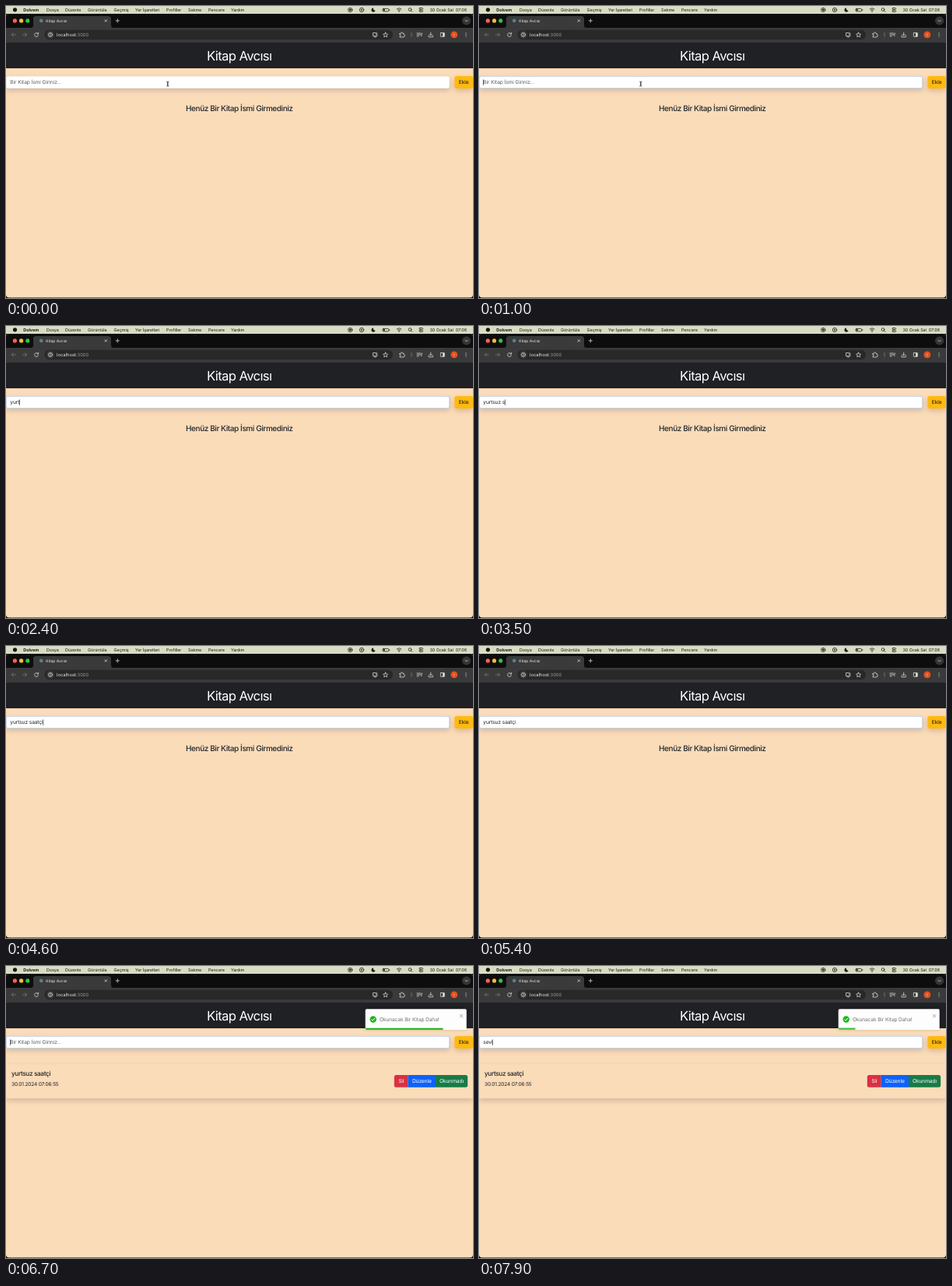
An HTML page for the animation above (8000 ms loop, 600 by 375 pixels).

```html
<!DOCTYPE html>
<html lang="tr">
<head>
<meta charset="utf-8">
<title>Kitap Avcısı</title>
<style>
  html, body { margin: 0; width: 100%; height: 100%; overflow: hidden; background: #000; }
  svg { display: block; width: 100vw; height: 100vh; }
  text {
    font: 400 6.67px Inter, Roboto, "Liberation Sans", sans-serif;
    letter-spacing: -.018em;
    text-rendering: geometricPrecision;
    white-space: pre;
    fill: #212529;
  }
  .mid { text-anchor: middle; }
  .menu text { font-size: 5.42px; letter-spacing: -.01em; fill: #17180f; }
  .menu .app { font-weight: 700; }
  .ui text { letter-spacing: 0; fill: #e8e8e8; }
  .line { fill: none; stroke-width: .8; stroke-linecap: round; stroke-linejoin: round; }
  .ui .line { stroke: #d6d6d6; }
  .menu .line { stroke: #22231a; }
  .ui .dim { stroke: #7b7b7b; }
  .shadow { filter: drop-shadow(0 3.3px 3.3px rgba(0, 0, 0, .16)); }
  .white { fill: #fff; }

  #field { stroke: #dee2e6; stroke-width: .5; animation: focus 8s linear infinite; }
  #beam { animation: beam 8s step-end infinite; }
  #empty { animation: empty 8s step-end infinite; }
  #card { animation: card 8s step-end infinite; }
  #toast {
    filter: drop-shadow(0 .5px 2px rgba(0, 0, 0, .16));
    animation: toast 8s cubic-bezier(.215, .61, .355, 1) infinite;
  }
  #bar { transform-origin: 461.7px 0; animation: bar 8s linear infinite; }

  @keyframes focus {
    0%, 10% { stroke: #dee2e6; }
    11.875%, 100% { stroke: #78aaf5; }
  }
  @keyframes beam { 0% { opacity: 1; } 21.25%, 100% { opacity: 0; } }
  @keyframes empty { 0% { opacity: 1; } 68.75%, 100% { opacity: 0; } }
  @keyframes card { 0% { opacity: 0; } 68.75%, 100% { opacity: 1; } }
  @keyframes toast {
    0%, 69.225% { transform: translateX(1250px); opacity: 0; }
    74.475% { transform: translateX(-10.4px); opacity: 1; }
    75.7875% { transform: translateX(4.2px); }
    77.1% { transform: translateX(-2.1px); }
    77.975%, 100% { transform: none; opacity: 1; }
  }
  @keyframes bar {
    0%, 77.975% { transform: none; }
    100% { transform: scaleX(.119); }
  }
</style>
</head>
<body>
<svg viewBox="0 0 600 375" preserveAspectRatio="none">
  <defs>
    <clipPath id="window"><rect y="10" width="600" height="364.4" rx="4"/></clipPath>
    <clipPath id="round"><rect x="461.7" y="55.2" width="130" height="26.7" rx="1.7"/></clipPath>
  </defs>

  <g class="menu">
    <rect width="600" height="10" fill="#d9dcc4"/>
    <circle cx="11.5" cy="4.8" r="2.6" fill="#17180f"/>
    <text class="app" x="22.3" y="6.9">Dolvem</text>
    <text x="52" y="6.9">Dosya</text>
    <text x="76" y="6.9">Düzenle</text>
    <text x="105" y="6.9">Görüntüle</text>
    <text x="138.6" y="6.9">Geçmiş</text>
    <text x="166" y="6.9">Yer İşaretleri</text>
    <text x="206" y="6.9">Profiller</text>
    <text x="234" y="6.9">Sekme</text>
    <text x="260" y="6.9">Pencere</text>
    <text x="289" y="6.9">Yardım</text>
    <text x="592" y="6.9" text-anchor="end">30 Ocak Sal  07:06</text>
    <g class="line">
      <circle cx="442.2" cy="5" r="2.7"/>
      <circle cx="457" cy="5" r="2.7"/>
      <rect x="484" y="3.4" width="7.6" height="3.5" rx="1"/>
      <path d="M492.7 4.6v1M502 3.9q3-2.6 6 0M503.3 5.4q1.7-1.5 3.4 0"/>
      <circle cx="519" cy="4.5" r="1.9"/>
      <path d="M520.5 6l1.5 1.5"/>
      <rect x="531" y="2.5" width="4.6" height="1.9" rx=".9"/>
      <rect x="531" y="5.6" width="4.6" height="1.9" rx=".9"/>
    </g>
    <g fill="#22231a">
      <circle cx="442.2" cy="5" r="1.4"/>
      <path d="M456.2 3.6l2.3 1.4-2.3 1.4zM472 2.3a2.7 2.7 0 1 0 2.6 3.6A2.7 2.7 0 0 1 472 2.3z"/>
      <rect x="484.7" y="4.1" width="2" height="2.1"/>
      <circle cx="505" cy="7" r=".8"/>
    </g>
  </g>

  <g clip-path="url(#window)">
    <rect y="10" width="600" height="365" fill="#fbdcb9"/>

    <g class="ui">
      <rect y="10" width="600" height="19" fill="#0d0d0d"/>
      <rect y="28" width="600" height="19" fill="#3a3a3a"/>
      <path d="M32 28q3 0 3-3v-8.5q0-3.5 3.5-3.5h93q3.5 0 3.5 3.5v8.500q0 3 3 3z" fill="#3a3a3a"/>
      <circle cx="11.4" cy="18.9" r="2.6" fill="#fe5f57"/>
      <circle cx="19.6" cy="18.9" r="2.6" fill="#febc2e"/>
      <circle cx="27.8" cy="18.9" r="2.6" fill="#28c840"/>
      <circle cx="45.2" cy="18.9" r="2.3" fill="#55809a"/>
      <text x="51.2" y="20.8" font-size="5" style="font-size:5px">Kitap Avcısı</text>
      <circle cx="591.6" cy="18.9" r="5.6" fill="#353535"/>
      <path class="line" d="M127 17.600l2.600 2.600m0-2.600l-2.600 2.600M141.200 18.900h4.200m-2.100-2.100v4.200M589.900 18.200l1.700 1.700 1.700-1.700"/>

      <rect x="49.500" y="30.700" width="447.500" height="12.500" rx="6.200" fill="#282828"/>
      <circle cx="57" cy="36.900" r="4.800" fill="#3b3b3b"/>
      <circle class="line" cx="57" cy="36.900" r="2.500"/>
      <path class="line" d="M57 36.700v1.300M57 35.500v.1"/>
      <text x="65" y="39" style="font-size:5.83px">localhost<tspan fill="#9b9b9b">:3000</tspan></text>
      <path class="line dim" d="M12.400 36.900h-5m2.100-2.200l-2.200 2.200 2.200 2.200M21.600 36.900h5m-2.100-2.200l2.200 2.200-2.200 2.200"/>
      <path class="line" d="M41.300 35.700a2.500 2.500 0 1 0 .3 1.900M41.600 34.200v1.800h-1.800"/>
      <path class="line" d="M474.500 34.500h-3v4h5.500v-1.300M473 39.900h2.600M476 34v2.600m-1.100-1.100l1.100 1.100 1.100-1.100"/>
      <path class="line" d="M487.600 34l.9 1.900 2.100.3-1.500 1.500.4 2.100-1.900-1-1.900 1 .4-2.100-1.500-1.500 2.100-.3z"/>
      <path class="line" d="M506 35.300h1.500q0-1.500 1.200-1.500t1.200 1.500h1.300v1.500q1.300 0 1.300 1.100t-1.300 1.100v1H506v-1.500q1.200 0 1.200-1t-1.200-1z"/>
      <path class="line dim" d="M521 34.300v5.200"/>
      <path class="line" d="M528 35h4.500M528 36.900h4.500M528 38.800h2.300M533.800 38.600v-3.400h1M543 38v1.800h5.400V38M545.700 34v3.800m-1.600-1.500l1.600 1.600 1.600-1.600"/>
      <rect class="line" x="558.300" y="34.400" width="5" height="5" rx=".6"/>
      <rect x="561" y="34.400" width="2.400" height="5" fill="#d6d6d6"/>
      <circle cx="575.800" cy="36.900" r="4.400" fill="#e5521f"/>
      <text class="mid" x="575.800" y="38.500" style="font-size:4.500px">f</text>
      <path class="line" style="stroke-width:1.200" d="M591 34.800v.01M591 36.900v.01M591 39v.01"/>
    </g>

    <rect y="47" width="600" height="33" fill="#202125"/>
    <text class="mid white" x="299.700" y="69.700" style="font-size:16.670px;letter-spacing:-.038em;fill:#fff">Kitap Avcısı</text>

    <g class="shadow">
      <rect id="field" x=".25" y="90.250" width="569.500" height="15.400" rx="2.500" fill="#fff"/>
      <rect x="576.300" y="90" width="23.700" height="15.900" rx="2.500" fill="#ffba10"/>
    </g>
    <text class="mid" x="588.200" y="100.400" style="fill:#111">Ekle</text>
    <text id="hint" x="5.300" y="100.400" style="fill:#5b5e62">Bir Kitap İsmi Giriniz...</text>
    <text id="typed" x="5.300" y="100.400"></text>
    <rect id="caret" y="94.400" width=".6" height="7.400" fill="#111"/>
    <path id="beam" class="line" stroke="#222" d="M206.600 97q1.200 0 1.200.8v4.400q0 .8-1.200.8M209 97q-1.200 0-1.200.8v4.400q0 .8 1.200.8"/>

    <text id="empty" class="mid" x="299.800" y="135.400" style="font-size:10px;font-weight:500;letter-spacing:-.042em">Henüz Bir Kitap İsmi Girmediniz</text>

    <g id="card">
      <g class="shadow">
        <rect y="126" width="600" height="44" fill="#fbdcb9" stroke="#ead0b3" stroke-width=".4"/>
      </g>
      <text x="7" y="141" style="font-size:8.330px;font-weight:500;letter-spacing:-.05em">yurtsuz saatçi</text>
      <text x="7" y="153.700" style="letter-spacing:-.033em">30.01.2024 07:06:55</text>
      <path d="M516.600 140h-15.300q-2.500 0-2.500 2.500v10.800q0 2.500 2.500 2.500h15.300z" fill="#d93043"/>
      <rect x="516.500" y="140" width="35.500" height="15.800" fill="#0d62fa"/>
      <path d="M552 140h38.600q2.500 0 2.500 2.500v10.800q0 2.500-2.500 2.500H552z" fill="#187b47"/>
      <g class="mid">
        <text x="507.700" y="150.400" style="fill:#fff">Sil</text>
        <text x="534.300" y="150.400" style="fill:#fff">Düzenle</text>
        <text x="572.500" y="150.400" style="fill:#fff">Okunmadı</text>
      </g>
    </g>

    <g id="toast">
      <rect x="461.700" y="55.200" width="130" height="26.700" rx="1.700" fill="#fdfdfd"/>
      <circle cx="471.700" cy="68.500" r="4.200" fill="#1cb61c"/>
      <path class="line" stroke="#fff" style="stroke-width:1" d="M469.700 68.700l1.500 1.500 2.700-3.200"/>
      <text x="480" y="70.800" style="fill:#757575;letter-spacing:-.022em">Okunacak Bir Kitap Daha!</text>
      <path class="line" stroke="#999" d="M583.300 62.300l3.600 3.600m0-3.600l-3.600 3.600"/>
      <g clip-path="url(#round)">
        <rect id="bar" x="461.700" y="79.700" width="130" height="2.200" fill="#1cb61c"/>
      </g>
    </g>
  </g>
</svg>
<script>
  const LOOP = 8000, LEFT = 5.3;
  const [hint, typed, caret, toast] =
    ["hint", "typed", "caret", "toast"].map(id => document.getElementById(id));
  const clock = toast.getAnimations()[0];

  const type = (word, times) => times.map((t, i) => [t, word.slice(0, i + 1)]);

  // Each entry: time in ms, content of the field from then on
  const log = [
    [800, ""],
    ...type("yurtsuz saatçi",
      [1700, 1900, 2050, 2200, 2400, 2700, 2900, 3100, 3300, 3500, 3900, 4100, 4300, 4500]),
    [5500, ""],
    ...type("sevi", [6900, 7100, 7350, 7600])
  ];

  function draw() {
    const t = (clock.currentTime || 0) % LOOP;
    const last = log.filter(([at]) => at <= t).pop();
    const value = last ? last[1] : "";
    if (typed.textContent !== value) typed.textContent = value;
    hint.style.opacity = value ? 0 : 1;
    caret.style.opacity = last && (t - last[0]) % 1000 < 500 ? 1 : 0;
    caret.setAttribute("x", LEFT + (value ? typed.getComputedTextLength() : 0));
    requestAnimationFrame(draw);
  }
  draw();
</script>
</body>
</html>
```
